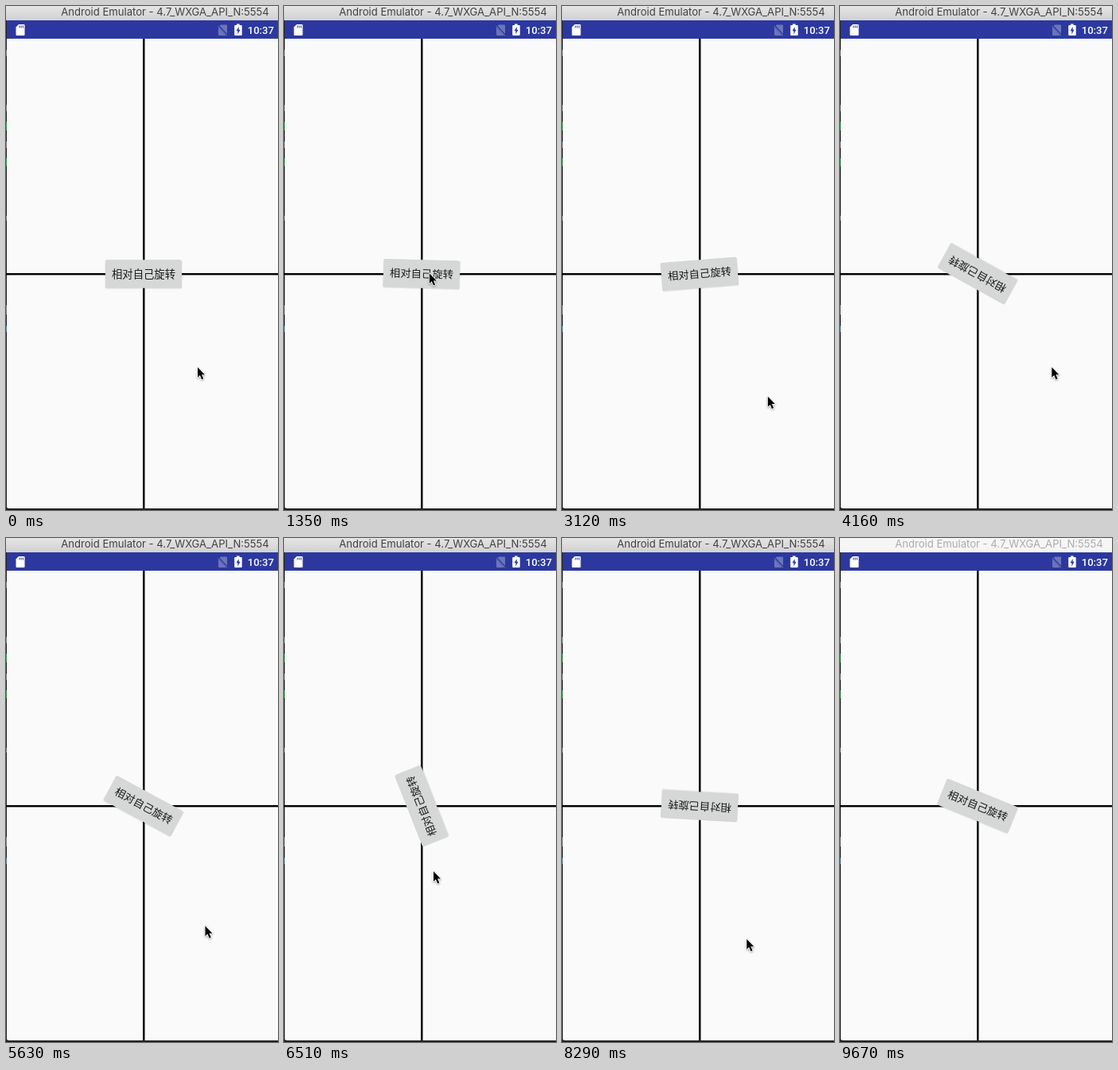
Recreate the animation shown at these times as an HTML page. Size 342x632 px, loop 9.69 s.

```html
<!DOCTYPE html>
<html lang="zh-CN">
<head>
<meta charset="utf-8">
<title>相对自己旋转</title>
<style>
  html, body { margin: 0; width: 100%; height: 100%; overflow: hidden; background: #fafafa; }
  svg { display: block; width: 342px; height: 632px; }
  .title { font: 13.1px Inter, sans-serif; fill: #414141; text-anchor: middle; }
  .clock { font: 500 13px Roboto, sans-serif; fill: #fff; text-anchor: middle; }
  .label { font: 13.35px "Noto Sans CJK SC", "Noto Sans CJK", sans-serif; fill: #1a1a1a; text-anchor: middle; }
  #cursor { filter: drop-shadow(0 1px 1px rgba(0, 0, 0, .35)); }
  .inactive .bar { fill: #f6f6f6; }
  .inactive .title { fill: #ababab; }
  .inactive #cursor { display: none; }
</style>
</head>
<body>
<svg id="stage" viewBox="0 0 342 632">
  <defs>
    <linearGradient id="chrome" x2="0" y2="1">
      <stop stop-color="#e5e5e5"/>
      <stop offset="1" stop-color="#d1d1d1"/>
    </linearGradient>
  </defs>
  <rect width="342" height="632" fill="#fafafa"/>

  <!-- desktop edge -->
  <path d="M.5 18V632" stroke="#222"/>
  <path d="M.5 55v8M.5 124v8M.5 170v8M.5 263v6M.5 375v12" stroke="#777"/>
  <path d="M.5 145v11M.5 191v10" stroke="#2f8a45"/>
  <path d="M.5 401v8" stroke="#4a7f86"/>

  <!-- title bar -->
  <rect class="bar" width="342" height="18" fill="url(#chrome)"/>
  <text class="title" x="200" y="12">Android Emulator - 4.7_WXGA_API_N:5554</text>

  <!-- status bar -->
  <rect x="1" y="18" width="341" height="23" fill="#2c38a0"/>
  <path d="M16 23H22.5q1 0 1 1V36q0 1-1 1H13.5q-1 0-1-1V26.5Z" fill="#fff"/>
  <path d="M17 24.5v3M19.2 24.5v3M21.4 24.5v3" stroke="#2c38a0"/>
  <path d="M270 23.5h7q1 0 1 1V36q0 1-1 1h-9q-1 0-1-1V26.5Z" fill="#6c75ba"/>
  <path d="M266.5 24.2L278.5 37" stroke="#2c38a0" stroke-width="2.2"/>
  <path d="M266.5 25L278 37.2" stroke="#6c75ba"/>
  <path d="M290 22.5h3.6v1.4h2.1q1 0 1 1V36q0 1-1 1h-7.5q-1 0-1-1V24.9q0-1 1-1h1.8Z" fill="#fff"/>
  <path d="M292.7 26l-3.2 5.2h1.9v4l3.2-5.4h-1.9Z" fill="#2c38a0"/>
  <text class="clock" x="320.3" y="35">10:37</text>

  <!-- cross hairs and lower edge -->
  <rect x="172" y="41" width="2.5" height="589"/>
  <rect y="335" width="342" height="2.4"/>
  <path d="M0 627q1 3 4 3H342v2H0Z" fill="#222"/>

  <g id="button">
    <rect x="124.4" y="318.4" width="97.2" height="36.4" rx="2.6" opacity=".08"/>
    <rect x="125" y="318.3" width="96" height="35.4" rx="2" fill="#d6d7d7"/>
    <text class="label" x="173" y="340.6">相对自己旋转</text>
  </g>

  <path id="cursor" d="M0 0V12.8L2.9 10.1L5.1 15.2L7.3 14.3L5 9.3H9Z"
        stroke="#fff" stroke-width="1.6" paint-order="stroke" stroke-linejoin="round"/>
</svg>
<script>
const LOOP = 9690, FIRST_MOVE = 300, INACTIVE_AT = 9670;
const REFRESH = 147.6, REFRESH_ORIGIN = 1343, LAST_MOVE = 9470;
const SPIN = 2000;

// Where the pointer turns: time, x, y of its tip
const turns = [
  [300, 241, 453], [1250, 183, 334], [2240, 177.6, 373], [3600, 291, 536],
  [4160, 266.3, 453], [5630, 250.5, 486.5], [6510, 188, 418],
  [7110, 242, 475], [8290, 232.3, 503], [9470, 275, 636]
];

const stage = document.getElementById('stage');
const button = document.getElementById('button');
const cursor = document.getElementById('cursor');

function recordedTime(t) {
  if (t < FIRST_MOVE) return 0;
  if (t >= INACTIVE_AT) return INACTIVE_AT;
  const n = Math.floor((Math.min(t, LAST_MOVE) - REFRESH_ORIGIN) / REFRESH);
  return REFRESH_ORIGIN + n * REFRESH + 8;
}

// Each repeat begins with a slightly longer delay than the one before.
const spinStart = n => 1267 + 1981 * n + 10 * n * n;

// Every other turn runs in reverse; each one eases in and out.
function angleAt(t) {
  let n = 0;
  while (spinStart(n + 1) <= t) n++;
  const p = Math.min(1, Math.max(0, (t - spinStart(n)) / SPIN));
  const turn = (1 - Math.cos(Math.PI * p)) / 2;
  return 360 * (n % 2 ? 1 - turn : turn);
}

function pointerAt(t) {
  const next = turns.findIndex(([time]) => time > t);
  if (next < 0) return turns.at(-1).slice(1);
  const [t1, x1, y1] = turns[next];
  const [t0, x0, y0] = turns[Math.max(0, next - 1)];
  const p = t1 > t0 ? (t - t0) / (t1 - t0) : 0;
  const eased = p * p * (3 - 2 * p);
  return [x0 + (x1 - x0) * eased, y0 + (y1 - y0) * eased];
}

function draw(now) {
  const t = recordedTime(now % LOOP);
  stage.classList.toggle('inactive', t >= INACTIVE_AT);
  button.setAttribute('transform', `rotate(${angleAt(t)} 173 336)`);
  cursor.setAttribute('transform', `translate(${pointerAt(t)})`);
}

let start;
function tick(now) {
  start ??= now;
  draw(Math.max(0, now - start));
  requestAnimationFrame(tick);
}
draw(0);
requestAnimationFrame(tick);
</script>
</body>
</html>
```
